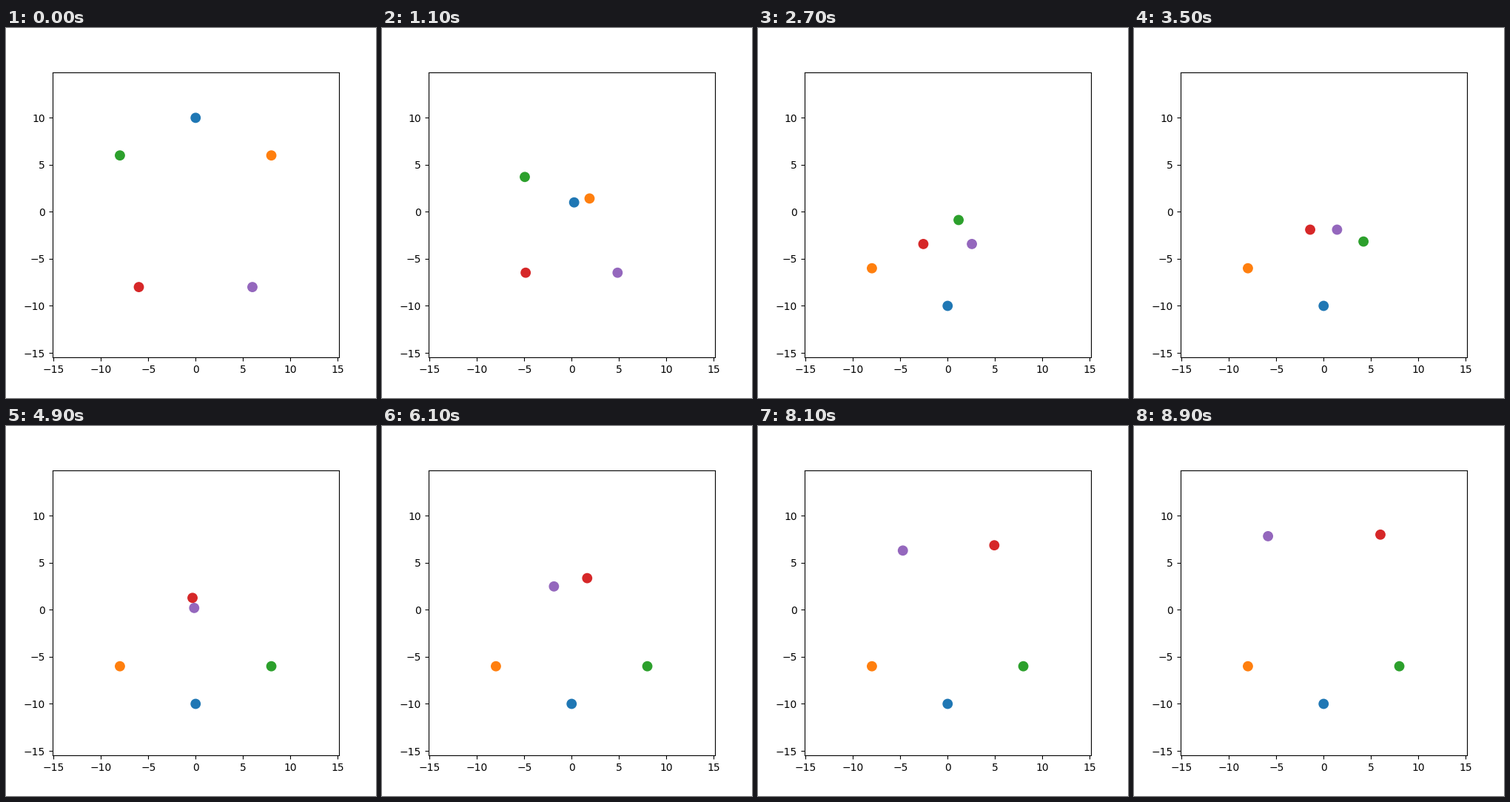
These frames come from a looping animation (500x500 px, 9.1 s). A matplotlib script:

```python
import numpy as np
import matplotlib.pyplot as plt
from matplotlib.animation import FuncAnimation

TICK = 100        # ms per animation frame
HOLD = 5          # frames spent on the starting pose
PER_STEP = 2      # frames per simulation step
STEPS = 43
RADIUS = 10       # every agent starts on this circle and crosses to the far side


class Agent:
    """Crosses the circle at constant speed, giving way once on the way.

    While giving way, from step `begin` to step `peak`, it loses `lag` units of
    progress and drifts `side` units to its left, then heads for its goal.
    """

    def __init__(self, start, speed, color, begin=0, peak=1, lag=0, side=0):
        self.start = np.array(start, float)
        self.heading = -self.start / RADIUS
        self.left = np.array([-self.heading[1], self.heading[0]])
        self.speed, self.color = speed, color
        self.begin, self.peak = begin, peak
        self.lag, self.side = lag, side
        self.arrival = (2 * RADIUS + lag) / speed

    def position(self, step):
        yielding = np.clip((step - self.begin) / (self.peak - self.begin), 0, 1)
        returning = np.clip((self.arrival - step) / (self.arrival - self.peak), 0, 1)
        travelled = min(self.speed * step - self.lag * yielding, 2 * RADIUS)
        drift = self.side * min(yielding, returning)
        return self.start + travelled * self.heading + drift * self.left


SLOW = 0.477
AGENTS = [
    Agent((0, 10), 5 * SLOW, "tab:blue", begin=3, peak=6, lag=1.63, side=0.8),
    Agent((8, 6), 4 * SLOW, "tab:orange"),
    Agent((-8, 6), 2 * SLOW, "tab:green"),
    Agent((-6, -8), SLOW, "tab:red", begin=16, peak=22, lag=0.15, side=1.08),
    Agent((6, -8), SLOW, "tab:purple", begin=16, peak=20, lag=0.72),
]


def positions(step):
    return [agent.position(step) for agent in AGENTS]


fig, ax = plt.subplots(figsize=(5, 5), dpi=100)
ax.set_xlim(-15.15, 15.15)
ax.set_ylim(-15.47, 14.83)
dots = ax.scatter(*zip(*positions(0)), s=80, c=[agent.color for agent in AGENTS])


def update(frame):
    step = 0 if frame < HOLD else (frame - HOLD) // PER_STEP + 1
    dots.set_offsets(positions(step))
    return (dots,)


anim = FuncAnimation(fig, update, frames=HOLD + STEPS * PER_STEP,
                     interval=TICK, repeat=True, repeat_delay=0)
plt.show()
```
